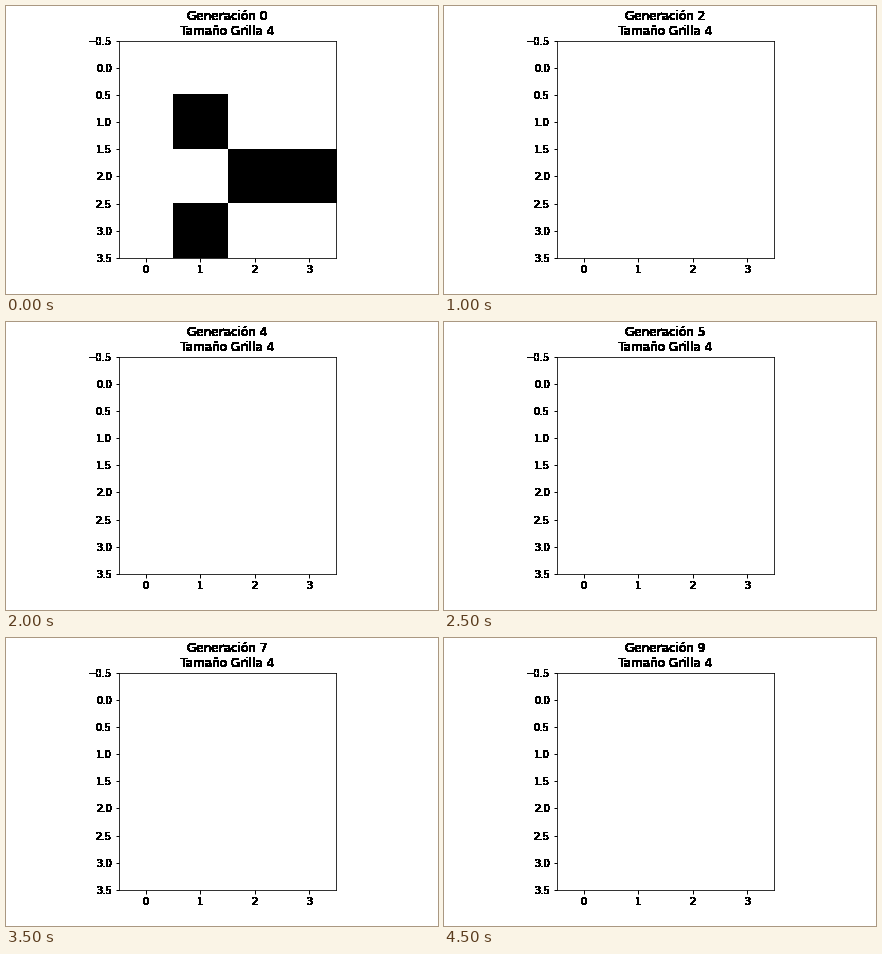
Animation of 432x288 px, one loop 5 s. Source, as a matplotlib script:

```python
import matplotlib.pyplot as plt
import numpy as np
from matplotlib.animation import FuncAnimation

SIZE = 4
GENERATIONS = 10
STEP_MS = 500

# Live cells (row, column) per generation; later generations are empty.
LIVE = {
    0: [(1, 1), (2, 2), (2, 3), (3, 1)],
    1: [(2, 1)],
}

plt.rcParams.update({
    "font.family": "DejaVu Sans",
    "font.size": 10,
    "xtick.major.width": 1,
    "ytick.major.width": 1,
})


def grid(gen):
    cells = np.zeros((SIZE, SIZE))
    for row, col in LIVE.get(gen, []):
        cells[row, col] = 1
    return cells


def solid(image, dpi):
    """Render every touched pixel as full black, without soft edges."""
    out = np.zeros_like(image)
    out[..., 3] = image[..., 3] > 0
    return out, 0, 0


fig, ax = plt.subplots(figsize=(6, 4), dpi=72, facecolor="white")
fig.subplots_adjust(left=0.125, right=0.9, bottom=0.125, top=0.88)

picture = ax.imshow(grid(0), cmap="binary", vmin=0, vmax=1,
                    interpolation="nearest")
ax.set_xticks(range(SIZE))
ax.set_yticks(np.arange(-0.5, SIZE, 0.5))
title = ax.set_title("", fontsize=12)

for text in [title, *ax.get_xticklabels(), *ax.get_yticklabels()]:
    text.set_agg_filter(solid)


def update(gen):
    picture.set_data(grid(gen))
    title.set_text(f"Generación {gen}\nTamaño Grilla {SIZE}")
    return picture, title


anim = FuncAnimation(fig, update, frames=GENERATIONS, interval=STEP_MS,
                     repeat=True, repeat_delay=0, blit=False)
plt.show()
```
